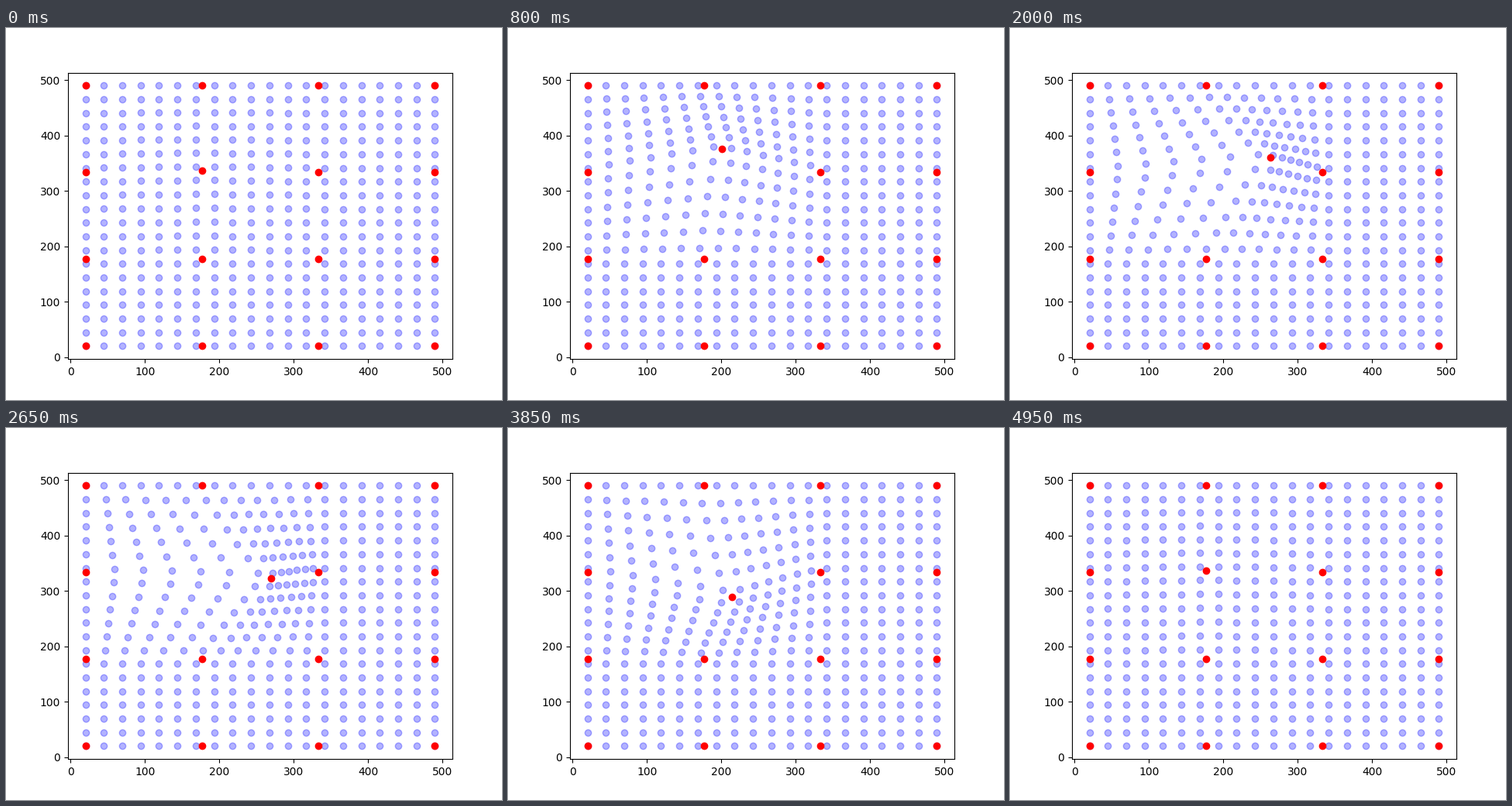
A matplotlib script that plays this animation: 640 by 480 pixels, repeating every 5000 ms.

```python
import numpy as np
import matplotlib.pyplot as plt
from matplotlib.animation import FuncAnimation

FRAMES = 100
LOW, HIGH = 20, 490
SPEED = 3

fig, ax = plt.subplots(figsize=(6.4, 4.8), dpi=100)

knots = np.linspace(LOW, HIGH, 4)
ctrl_x, ctrl_y = (g.ravel() for g in np.meshgrid(knots, knots))
grid_x, grid_y = (g.ravel() for g in np.meshgrid(*[np.linspace(LOW, HIGH, 20)] * 2))

# The handle walks a closed loop in steps of constant length.
angle = np.linspace(0, 2 * np.pi, FRAMES)
shift_x = SPEED * np.cumsum(np.sin(angle))
shift_y = SPEED * np.cumsum(np.cos(angle))
handle = 2 * 4 + 1


def hat(values, center):
    """Linear weight falling from 1 at center to 0 at the next knot."""
    return np.clip(1 - np.abs(values - center) / (knots[1] - knots[0]), 0, 1)


# Bilinear influence of the handle on every grid point
weight = hat(grid_x, ctrl_x[handle]) * hat(grid_y, ctrl_y[handle])

dots, = ax.plot(grid_x, grid_y, "bo", alpha=0.3)
handles, = ax.plot(ctrl_x, ctrl_y, "ro")
ax.set_xlim(ax.get_xlim())
ax.set_ylim(ax.get_ylim())


def update(i):
    dx, dy = shift_x[i], shift_y[i]
    dots.set_data(grid_x + weight * dx, grid_y + weight * dy)
    x, y = ctrl_x.copy(), ctrl_y.copy()
    x[handle] += dx
    y[handle] += dy
    handles.set_data(x, y)
    return dots, handles


anim = FuncAnimation(fig, update, frames=FRAMES, interval=50, repeat=True)
plt.show()
```
